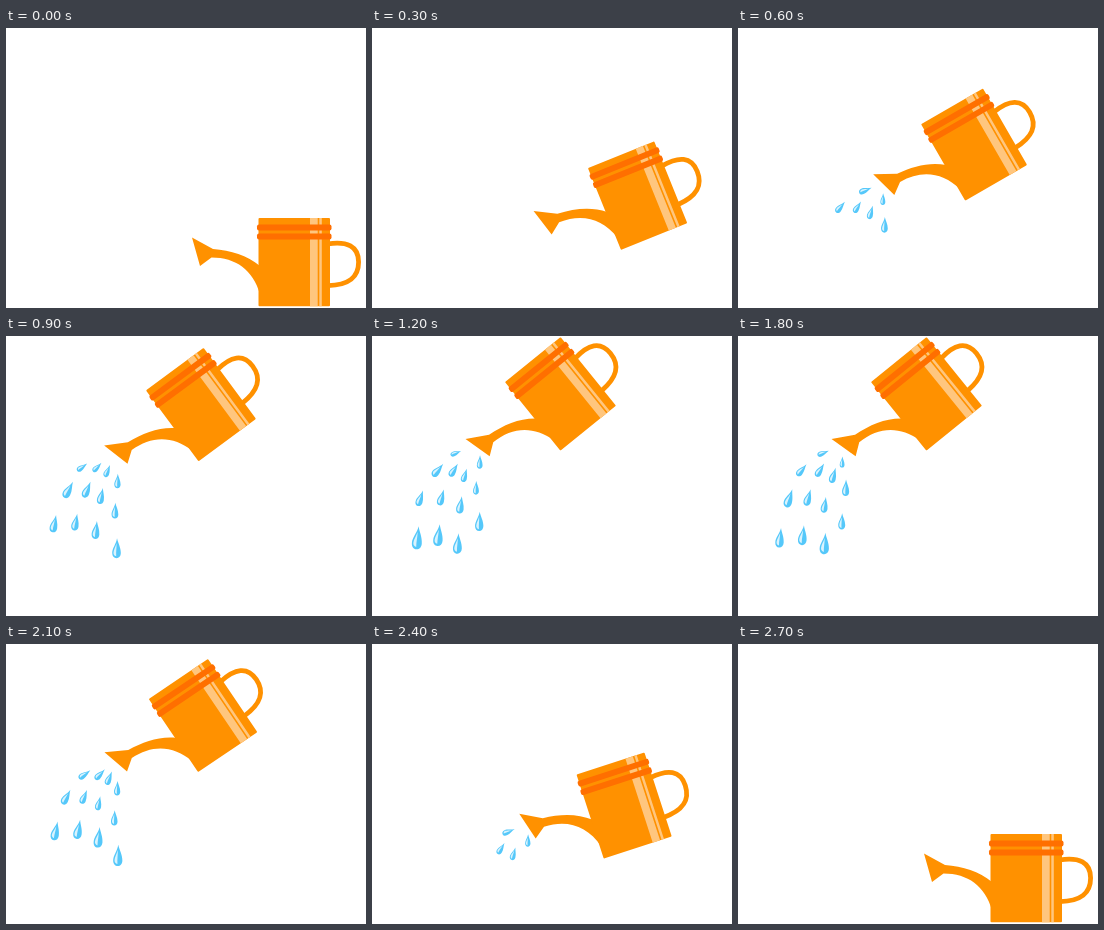
These frames come from a looping animation (360x280 px, 3 s). An HTML page:

```html
<!DOCTYPE html>
<html lang="en">
<head>
<meta charset="utf-8">
<title>Watering can</title>
<style>
  html, body { margin: 0; width: 100%; height: 100%; overflow: hidden; background: #fff; }
  svg { display: block; width: 100%; height: 100%; }
</style>
</head>
<body>
<svg viewBox="0 0 360 280">
  <defs>
    <g id="drop">
      <path fill="#55c8fa" d="M.5-10C1.5-5 4.3-1 4.3 4.8C4.3 8 2.4 10 0 10C-2.5 10-4.3 8-4.3 4.8C-4.3 0-.5-4 .5-10Z"/>
      <path fill="#d9f3fe" d="M0-5C.2 0-.6 3-.3 8C-2.3 7.5-3.2 6-3 4.2C-2.8 1.4-1.100-1 0-5Z"/>
    </g>
  </defs>
  <g id="rain"></g>
  <g id="can" fill="#ff9100">
    <path fill="none" stroke="#ff9100" stroke-width="4.800" d="M322 215.800C341 213 352.600 218 352.600 234C352.600 250 342 257 322 257.600"/>
    <path d="M186 209.500L207 221C225 222.500 241 227 254 238V266C247 242 230 229.500 205.500 229.500L194 238Z"/>
    <rect x="252.500" y="190" width="71.500" height="88.300" rx="1"/>
    <path fill="#ffc67e" d="M304 190h7.700v88.300h-7.700zM313.300 190h2.500v88.300h-2.500z"/>
    <g fill="#ff6f00">
      <rect x="251" y="196.500" width="74.500" height="6" rx="2"/>
      <rect x="251" y="205.500" width="74.500" height="6" rx="2"/>
    </g>
  </g>
</svg>
<script>
const LOOP = 3000, STEP = 150, LAST = 18;
const RAYS = 4, WAVES = 12, PERIOD = 4 / 3;
const can = document.getElementById('can');
const rain = document.getElementById('rain');

// step, then body centre and tilt in degrees; straight moves between
const rest = [288, 234.5, 0], pour = [188.5, 58.3, -39];
const path = [
  [0, ...rest], [2, 265.5, 168, -22], [4, 236, 117, -30], [6, 195, 69, -36.5], [7, ...pour],
  [13, ...pour], [14, 197, 72, -34], [16, 252, 162, -18], [LAST, ...rest]
];

function poseAt(step) {
  const i = Math.max(1, path.findIndex(key => key[0] >= step));
  const [from, ...a] = path[i - 1], [to, ...b] = path[i];
  const u = (step - from) / (to - from);
  return a.map((v, n) => v + (b[n] - v) * u);
}

function nozzle([cx, cy, tilt]) {
  const a = tilt * Math.PI / 180, c = Math.cos(a), s = Math.sin(a);
  return [cx - 98 * c + 10.5 * s, cy - 98 * s - 10.5 * c];
}

// every ray sheds a drop each PERIOD, the two inner rays a little later
const drops = Array.from({ length: RAYS * WAVES }, (_, id) => {
  const ray = id % RAYS, wave = Math.floor(id / RAYS);
  const inner = ray === 1 || ray === 2;
  const use = document.createElementNS('http://www.w3.org/2000/svg', 'use');
  use.setAttribute('href', '#drop');
  rain.append(use);
  return { use, side: ray / (RAYS - 1), born: wave * PERIOD + (inner ? 2 : 1) / 3, wobble: Math.sin(id * 7) };
});

function drawDrop({ use, side, born, wobble }, step, nx, ny) {
  const age = step - born;
  const oldest = Math.min(step - 1.5, 5.1, 34.2 - 2 * step);
  const x = side * (2 * age - 22.5) * age + 2 * wobble;
  const y = (12 - 10 * side + (2.2 + side) * age) * age;
  const shown = age > .8 && age < oldest && y < 102;
  use.style.display = shown ? '' : 'none';
  if (!shown) return;

  const vx = side * (4 * age - 22.5);
  const vy = 12 - 10 * side + 2 * (2.2 + side) * age;
  const lean = Math.atan2(-vx, vy) * 180 / Math.PI;
  const size = (10 + 2.2 * age) * (1 + .1 * wobble) / 20;
  use.setAttribute('transform', `translate(${nx + x} ${ny + y}) rotate(${lean}) scale(${size})`);
}

function draw(step) {
  const pose = poseAt(step), [cx, cy, tilt] = pose, [nx, ny] = nozzle(pose);
  can.setAttribute('transform', `translate(${cx} ${cy}) rotate(${tilt}) translate(-288 -234.5)`);
  for (const drop of drops) drawDrop(drop, step, nx, ny);
}

let shownStep = -1;
const began = performance.now();
function tick() {
  const t = (performance.now() - began) % LOOP;
  const step = Math.min(Math.floor(t / STEP), LAST);
  if (step !== shownStep) draw(shownStep = step);
  requestAnimationFrame(tick);
}
tick();
</script>
</body>
</html>
```
